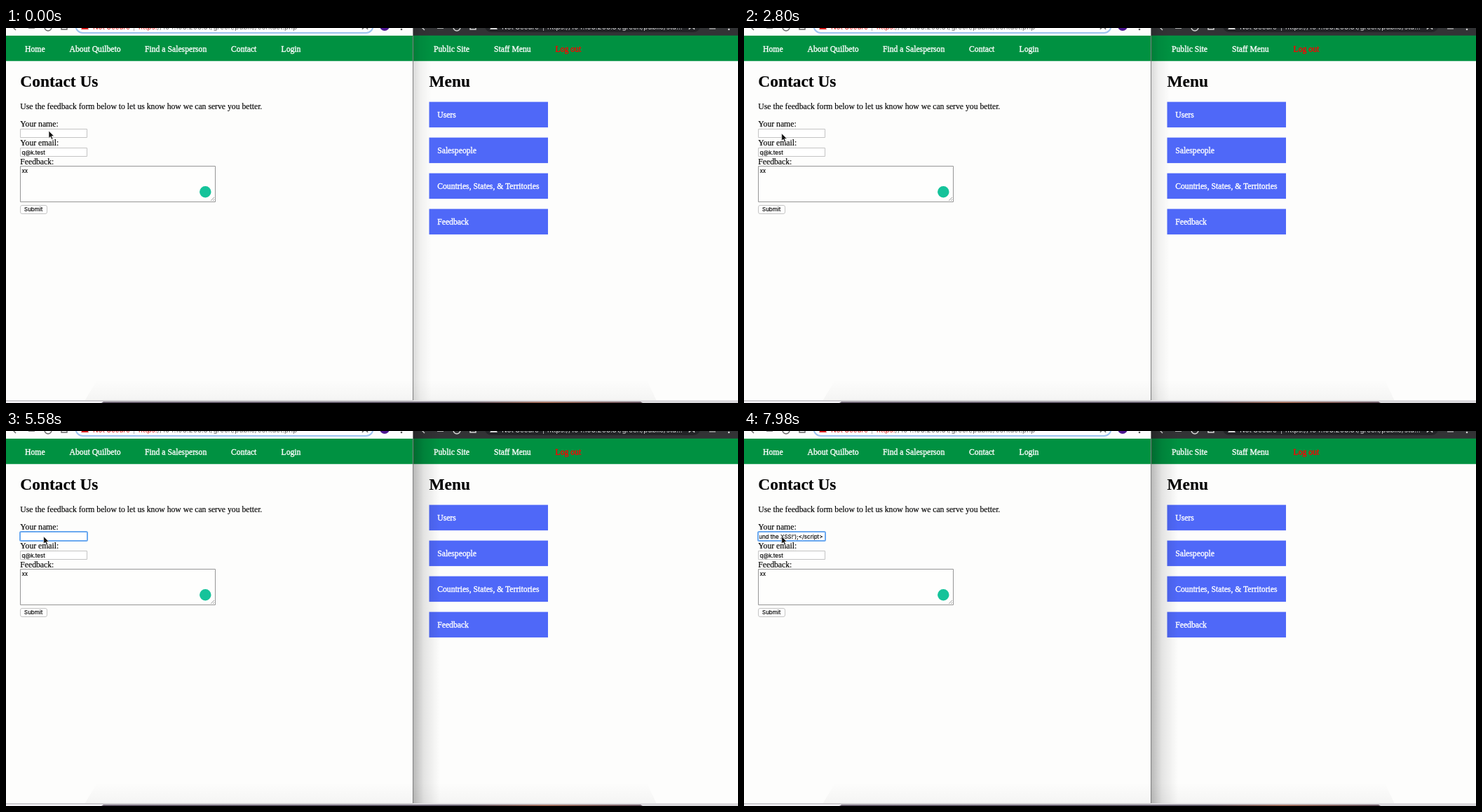
Animation, 1044 px wide and 536 px high, one loop 8000 ms. Source, as an HTML page:

```html
<!DOCTYPE html>
<html lang="en">
<head>
<meta charset="utf-8">
<title>Feedback form</title>
<style>
  html, body { margin: 0; width: 100%; height: 100%; overflow: hidden; background: #fdfdfc; }
  svg { display: block; width: 1044px; height: 536px; }
  text { font: 11.7px "Liberation Serif", "Times New Roman", serif; white-space: pre; stroke: #000; stroke-width: .15; }
  .title { font-size: 23.4px; font-weight: bold; }
  .nav text, .menu text { fill: #fff; stroke: #fff; stroke-width: .35; }
  .nav .out { fill: #f00; stroke: #f00; }
  .menu rect { fill: #4f68f8; }
  .small { font: 8px Inter, "Liberation Sans", sans-serif; }
  .url { font: 10px Inter, "Liberation Sans", sans-serif; stroke: none; }
  .icons { fill: none; stroke-width: 1.4; }
  .field { fill: #fff; stroke: #c4c4c4; }
</style>
</head>
<body>
<svg viewBox="0 0 1044 536">
  <defs>
    <linearGradient id="side">
      <stop offset="0" stop-opacity=".27"/>
      <stop offset=".4" stop-opacity=".1"/>
      <stop offset="1" stop-opacity="0"/>
    </linearGradient>
    <linearGradient id="under" x2="0" y2="1">
      <stop offset="0" stop-opacity="0"/>
      <stop offset="1" stop-opacity=".035"/>
    </linearGradient>
    <linearGradient id="strip">
      <stop offset="0" stop-color="#6f6574"/>
      <stop offset=".68" stop-color="#67606f"/>
      <stop offset=".82" stop-color="#a3705f"/>
      <stop offset="1" stop-color="#6d5c68"/>
    </linearGradient>
    <clipPath id="inside"><path d="M22 144h92v13h-92z"/></clipPath>
    <g id="tools">
      <path d="M15-4l-4 4 3 3M32 0h9M65-1a5 5 0 0 1-10 0M79-3v5h8v-5"/>
    </g>
    <path id="star" d="M-4 4l1.5-5-4-3h5l1.5-4 1.5 4h5l-4 3 1.5 5-4-3z"/>
  </defs>

  <!-- Right window -->
  <path fill="#323335" d="M580 0h464v11h-464z"/>
  <rect x="683" y="-12" width="307" height="18" rx="9" fill="#222326"/>
  <g class="icons" stroke="#d8d8d8">
    <use href="#tools" x="583"/>
    <use href="#star" x="978" y="-2" stroke-width="1"/>
    <path d="M1003 1h9" stroke="#aaa"/>
  </g>
  <g fill="#d4d4d4">
    <path d="M690 2h11l-5-9z"/>
    <circle cx="1031" cy="2" r="1.3"/>
    <text class="url" x="707" y="2">Not Secure</text>
    <text class="url" x="765" y="2">|</text>
    <text class="url" x="772" y="2">https://104.198.208.81/green/public/sta…</text>
  </g>
  <path fill="#009141" d="M0 10.800h1044v36.500H0z"/>
  <g class="nav">
    <text x="610" y="33.7">Public Site</text>
    <text x="696" y="33.7">Staff Menu</text>
    <text class="out" x="783.5" y="33.7">Log out</text>
  </g>
  <text class="title" x="603.5" y="84">Menu</text>
  <g class="menu" id="menu"></g>
  <rect id="shade" x="581" width="38" height="533" fill="url(#side)"/>

  <!-- Left window -->
  <path fill="#fdfdfc" d="M0 0h580v10.800H0z"/>
  <rect x="99.5" y="-13" width="424" height="20" rx="10" fill="#fff" stroke="#9dc3ef" stroke-width="2"/>
  <g class="icons" stroke="#666">
    <use href="#tools"/>
    <use href="#star" x="512" y="-2" stroke-width="1"/>
  </g>
  <path fill="#d8201f" d="M107 2h11l-5.500-9z"/>
  <g fill="#d8201f">
    <text class="url" x="124" y="2">Not Secure</text>
    <text class="url" x="189" y="2">https:<tspan fill="#666">//104.198.208.81/green/public/contact.php</tspan></text>
  </g>
  <text class="url" x="181" y="2" fill="#999">|</text>
  <circle cx="540" cy="-3" r="7" fill="#4b168f"/>
  <circle cx="564" cy="2" r="1.3" fill="#555"/>
  <g class="nav">
    <text x="27" y="33.7">Home</text>
    <text x="90.500" y="33.7">About Quilbeto</text>
    <text x="198" y="33.7">Find a Salesperson</text>
    <text x="321" y="33.7">Contact</text>
    <text x="392.500" y="33.7">Login</text>
  </g>
  <text class="title" x="20.300" y="84">Contact Us</text>
  <text x="20.300" y="116">Use the feedback form below to let us know how we can serve you better.</text>
  <text x="20.300" y="141">Your name:</text>
  <text x="20.300" y="168">Your email:</text>
  <text x="20.300" y="194.500">Feedback:</text>
  <path class="field" d="M20.500 144.500h95v12h-95zM20.500 171.500h95v12h-95z"/>
  <rect id="ring" x="20" y="144" width="96" height="13" rx="1.500" fill="#fff" stroke="#6ba9f0" stroke-width="2"/>
  <g clip-path="url(#inside)">
    <text id="entry" class="small" x="112.500" y="153.500" text-anchor="end">&lt;script&gt;alert('I found the XSS!');&lt;/script&gt;</text>
  </g>
  <rect id="caret" y="146" width="1" height="9"/>
  <text class="small" x="22.500" y="180.500">q@k.test</text>
  <path fill="#fefefd" stroke="#969696" d="M20.500 197.500h278v51h-278z"/>
  <path stroke="#888" stroke-width=".8" d="M292 247l5-5M295 247l2-2"/>
  <text class="small" x="22.500" y="207">xx</text>
  <circle cx="284.300" cy="234.300" r="8.200" fill="#15c39a"/>
  <rect x="20.500" y="253.500" width="38" height="12" rx="2.500" fill="#fff" stroke="#c4c4c4"/>
  <text class="small" x="26" y="262.300">Submit</text>
  <path fill="#808080" d="M580 0h1v533h-1z"/>

  <!-- Lower screen edge -->
  <path fill="url(#under)" d="M130 503h784l14 30H112z"/>
  <path fill="#dad8dc" d="M0 532h1044v4H0z"/>
  <path fill="#c4c2c6" d="M0 532h580v1H0z"/>
  <path fill="#f3f1f5" d="M0 534h139v2H0z"/>
  <path fill="url(#strip)" d="M139 534h766l3 2H136z"/>

  <path id="mouse" fill="#111" stroke="#fff" stroke-width=".6" d="M0 0v10.500l2.400-2.200 1.700 3.900 1.800-.8-1.700-3.800h3.300z"/>
</svg>
<script>
  const LOOP = 8000, CLICK = 4600, PASTE = 6000;
  const [menu, shade, ring, entry, caret, mouse] =
    ["menu", "shade", "ring", "entry", "caret", "mouse"].map(id => document.getElementById(id));

  menu.innerHTML = ["Users", "Salespeople", "Countries, States, &amp; Territories", "Feedback"]
    .map((label, i) => `<g transform="translate(603.5 ${105.6 + 51 * i})">
      <rect width="169.500" height="36.500"/><text x="11.700" y="22.400">${label}</text></g>`).join("");

  const progress = (t, from, to) => Math.min(1, Math.max(0, (t - from) / (to - from)));
  const show = (el, on) => el.setAttribute("visibility", on ? "visible" : "hidden");

  function draw(now) {
    const t = now % LOOP, focused = t >= CLICK, pasted = t >= PASTE;
    const first = progress(t, 50, 800), second = progress(t, 850, 1500);
    mouse.setAttribute("transform", `translate(${61 - 5 * first - 2.3 * second} ${147 + 4 * first - .3 * second})`);

    show(ring, focused);
    show(entry, pasted);
    caret.setAttribute("x", pasted ? 112.5 : 22.5);
    show(caret, focused && (t - (pasted ? PASTE : CLICK)) % 1000 < 500);

    // The left window casts a deeper shadow once it is active
    shade.setAttribute("width", focused ? 38 : 26);
    shade.setAttribute("opacity", focused ? 1 : .5);
    requestAnimationFrame(() => draw(performance.now()));
  }
  draw(0);
</script>
</body>
</html>
```
